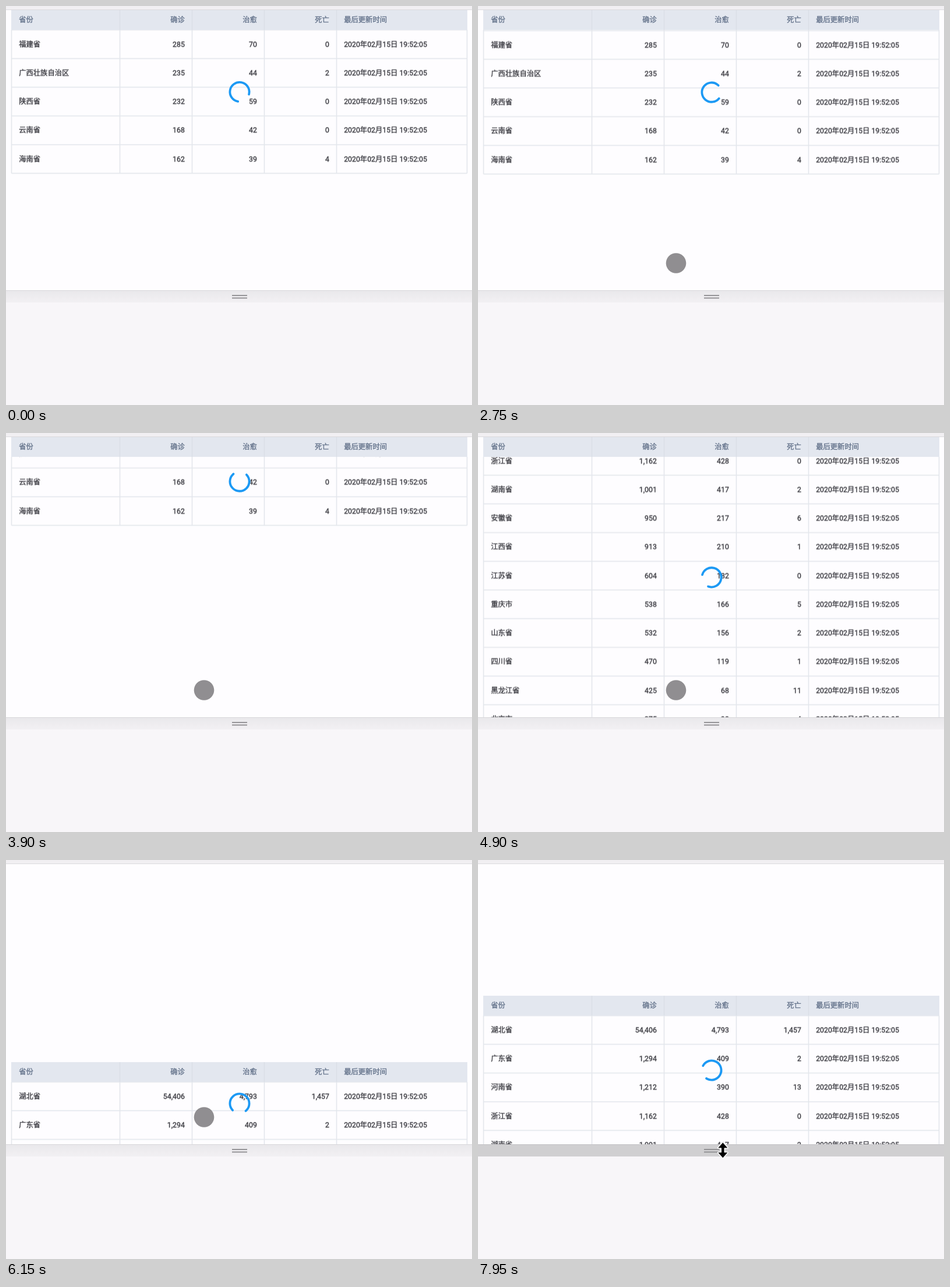
Write an HTML page with a canvas that moves like this. It is 800 by 685 pixels and loops after 8000 ms.

```html
<!DOCTYPE html>
<html lang="zh-CN">
<head>
<meta charset="utf-8">
<title>Table loading</title>
<style>
html, body { margin: 0; width: 100%; height: 100%; overflow: hidden; background: #f8f6f9; }
canvas { display: block; }
</style>
</head>
<body>
<canvas id="stage" width="800" height="685"></canvas>
<script>
const LOOP = 8000, TOP = 7, BOTTOM = 488, HEAD = 34, ROW = 49.25;
const LEFT = 9.5, RIGHT = 791.5, PAD = 12.7;
const COLS = [0, 1, 2, 3].map(i => 195.5 + i * 124);
const FONT = '12.3px Roboto, "Noto Sans CJK SC", "Noto Sans CJK", sans-serif';
const TITLES = ['省份', '确诊', '治愈', '死亡', '最后更新时间'];
const DATE = '2020年02月15日 19:52:05';

const rows = `湖北省 54,406 4,793 1,457
广东省 1,294 409 2
河南省 1,212 390 13
浙江省 1,162 428 0
湖南省 1,001 417 2
安徽省 950 217 6
江西省 913 210 1
江苏省 604 182 0
重庆市 538 166 5
山东省 532 156 2
四川省 470 119 1
黑龙江省 425 68 11
北京市 375 98 4
上海市 326 90 1
河北省 291 87 3
福建省 285 70 0
广西壮族自治区 235 44 2
陕西省 232 59 0
云南省 168 42 0
海南省 162 39 4`.split('\n').map(r => [...r.split(' '), DATE]);
const HEIGHT = HEAD + rows.length * ROW;
const REST_LOW = 287.25 - HEIGHT + HEAD - HEAD, REST_HIGH = 233.2;

const g = document.getElementById('stage').getContext('2d');

const part = (t, from, length) => Math.min(1, Math.max(0, (t - from) / length));

// Out and back again; a skew below 1 makes the way out quicker
const bounce = (t, from, length, skew = 1) =>
  Math.sin(Math.PI * part(t, from, length) ** skew) ** 2;

// Top edge of the table: three pulls at its end, a flick to its start, one long pull there
function tableTop(t) {
  return REST_LOW
    - 111 * bounce(t, 1700, 700)
    + 115 * bounce(t, 2728, 700)
    - 136 * bounce(t, 3430, 820)
    + (REST_HIGH - REST_LOW) * part(t, 4232, 868) ** 2
    + 227 * bounce(t, 5100, 1700, .6);
}

function rect(c, color, x, y, w, h) {
  c.fillStyle = color;
  c.fillRect(x, y, w, h);
}

function cells(c, color, texts, y) {
  c.fillStyle = c.strokeStyle = color;
  c.lineWidth = .35;
  texts.forEach((text, i) => {
    const number = i > 0 && i < 4;
    const x = number ? COLS[i] - PAD : (i ? COLS[3] : LEFT) + PAD;
    c.textAlign = number ? 'right' : 'left';
    c.fillText(text, x, y);
    c.strokeText(text, x, y);
  });
}

// Both table parts are softened once and then only moved
function sprite(height, paint) {
  const canvas = document.createElement('canvas');
  canvas.width = 800;
  canvas.height = Math.ceil(height);
  const c = canvas.getContext('2d');
  c.font = FONT;
  paint(c);
  return canvas;
}

const head = sprite(HEAD, c => {
  rect(c, '#e3e7ef', LEFT - .5, 0, RIGHT - LEFT + 1, HEAD);
  c.filter = 'blur(0.6px)';
  for (const x of COLS) rect(c, '#dadfe7', x - .7, 0, 1.4, HEAD);
  cells(c, '#64738b', TITLES, 21);
});

const body = sprite(HEIGHT + 3, c => {
  c.filter = 'blur(0.6px)';
  for (const x of [LEFT, ...COLS, RIGHT]) rect(c, '#e3e6ec', x - .8, 0, 1.6, HEIGHT);
  for (let i = 0; i <= rows.length; i++)
    rect(c, '#e3e6ec', LEFT, HEAD + i * ROW - .8, RIGHT - LEFT, 1.6);
  rows.forEach((r, i) => cells(c, '#3a3a40', r, HEAD + i * ROW + 28.8));
});

function drawClipped(image, y, from) {
  g.save();
  g.beginPath();
  g.rect(0, from, 800, Math.max(0, BOTTOM - from));
  g.clip();
  g.drawImage(image, 0, y);
  g.restore();
}

function drawTable(top) {
  const headY = Math.max(TOP, Math.round(top));
  drawClipped(body, top, headY + HEAD);
  drawClipped(head, headY, TOP);
}

function drawSpinner(t, top) {
  const y = (Math.max(TOP, top) + Math.min(BOTTOM, top + HEIGHT)) / 2 + .4;
  const turn = (57 + t * .24) * Math.PI / 180;
  g.beginPath();
  g.arc(401, y, 16.6, turn + .74, turn + 2 * Math.PI - .74);
  g.strokeStyle = '#1c99f4';
  g.lineWidth = 3.8;
  g.lineCap = 'round';
  g.stroke();
}

const barShade = g.createLinearGradient(0, BOTTOM, 0, BOTTOM + 21);
barShade.addColorStop(0, '#e9e8eb');
barShade.addColorStop(1, '#f2f0f3');

function drawFrame(hover) {
  rect(g, '#f1eff2', 0, 0, 800, 6);
  rect(g, '#dbdadd', 0, 6, 800, 1);
  rect(g, hover ? '#d0cfd1' : barShade, 0, BOTTOM, 800, 21);
  rect(g, hover ? '#c4c3c6' : '#d8d7da', 0, BOTTOM, 800, 1);
  rect(g, '#f8f6f9', 0, 509, 800, 176);
  for (const y of [496, 500.5]) rect(g, '#8d8c8f', 388, y, 26, 1.8);
}

function drawResize(x, y) {
  g.save();
  g.translate(x, y);
  g.beginPath();
  for (const s of [1, -1])
    for (const [px, py] of [[-2.3, 4], [-8, 4], [0, 13], [8, 4], [2.3, 4]]) g.lineTo(px * s, py * s);
  g.closePath();
  g.lineJoin = 'round';
  g.lineWidth = 3;
  g.strokeStyle = '#fff';
  g.stroke();
  g.fillStyle = '#000';
  g.fill();
  g.restore();
}

function drawTouch(t) {
  const leave = part(t, 7200, 150) ** 2, enter = 1 - part(t, 400, 200);
  g.beginPath();
  g.arc(340 + 75 * leave, 441.5 + 28 * leave + 26 * enter ** 2, 17.3, 0, 2 * Math.PI);
  g.fillStyle = '#908e91';
  g.fill();
}

function draw(now) {
  const t = now % LOOP, top = tableTop(t), hover = t >= 7350;
  rect(g, '#fefdff', 0, 0, 800, 685);
  drawTable(top);
  drawSpinner(t, top);
  drawFrame(hover);
  if (hover) drawResize(420.3, 498.3 + 12 * bounce(t, 7350, 600));
  else if (t >= 400) drawTouch(t);
  requestAnimationFrame(() => draw(performance.now() - start));
}

const start = performance.now();
draw(0);
</script>
</body>
</html>
```
